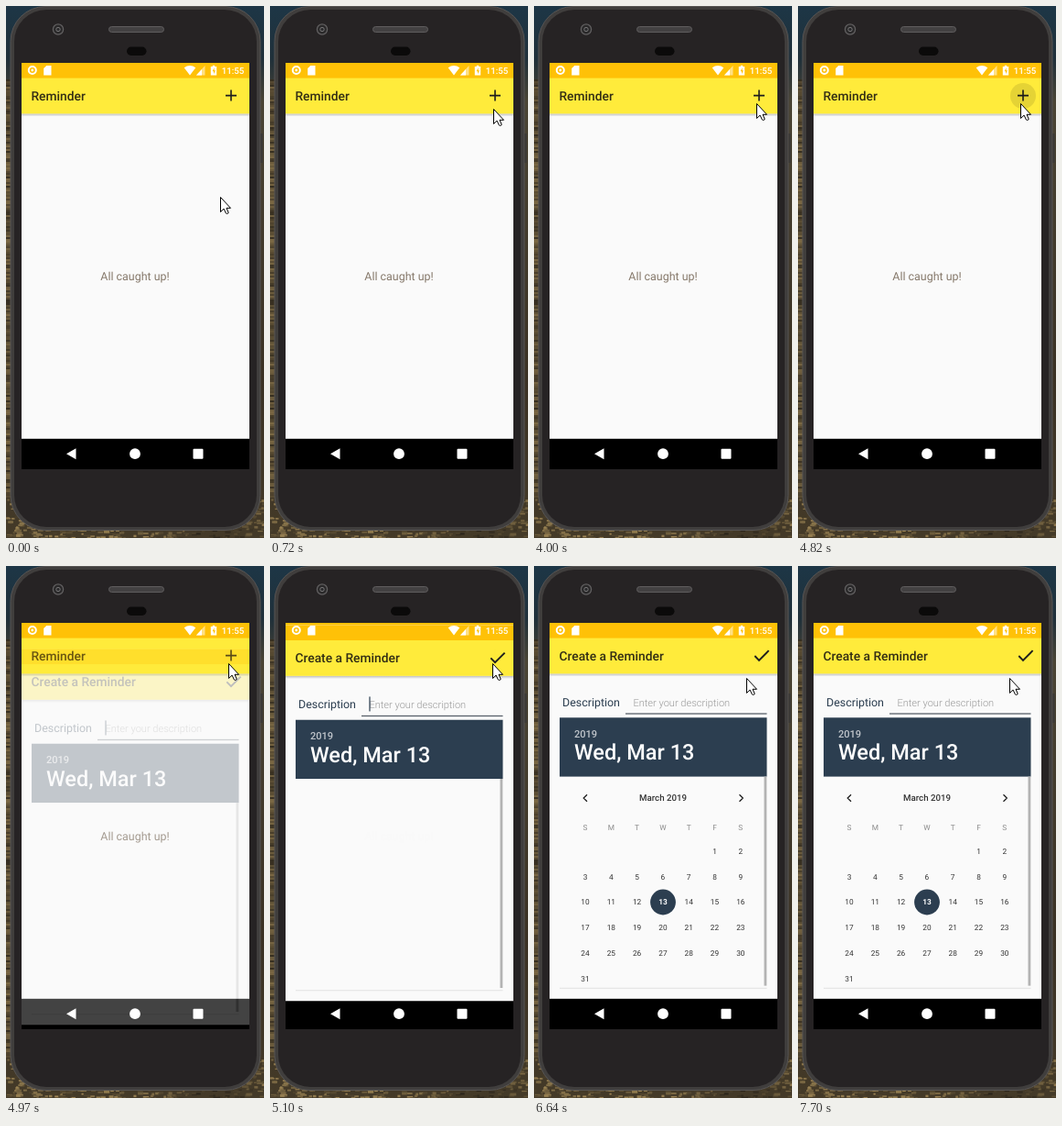
Animation, 282 px wide and 580 px high, one loop 8000 ms. Source, as an HTML page:

```html
<!DOCTYPE html>
<html lang="en">
<head>
<meta charset="utf-8">
<title>Reminder app</title>
<style>
html, body { margin: 0; width: 100%; height: 100%; overflow: hidden; background: #1c1a17; }
svg { display: block; width: 282px; height: 580px; font-family: Roboto, "Noto Sans", sans-serif; text-rendering: geometricPrecision; }
.m { font-weight: 500; }
.mid { text-anchor: middle; }
.title { font-size: 13.8px; font-weight: 500; fill: #332e14; }
.label { font-size: 12.45px; }
.line { fill: none; stroke: #1d1d1d; }
</style>
</head>
<body>
<svg viewBox="0 0 282 580">
  <defs>
    <linearGradient id="sky" x2="0" y2="1">
      <stop offset="0" stop-color="#1d3646"/>
      <stop offset=".1" stop-color="#20303a"/>
      <stop offset=".18" stop-color="#4a4434"/>
      <stop offset=".7" stop-color="#3a3123"/>
      <stop offset="1" stop-color="#443a28"/>
    </linearGradient>
    <linearGradient id="shade" x2="0" y2="1">
      <stop offset="0" stop-opacity=".24"/>
      <stop offset="1" stop-opacity="0"/>
    </linearGradient>
    <clipPath id="screen"><rect x="17" y="62" width="249" height="443"/></clipPath>
    <g id="bars">
      <rect x="17" y="62" width="249" height="443" fill="#fafafa"/>
      <rect x="17" y="117.4" width="249" height="3.2" fill="url(#shade)"/>
      <rect x="17" y="78" width="249" height="39.4" fill="#ffeb3b"/>
      <rect x="17" y="62" width="249" height="16.6" fill="#ffc107"/>
      <rect x="17" y="471.8" width="249" height="33.2"/>
    </g>
  </defs>

  <rect width="282" height="580" fill="url(#sky)"/>
  <g id="wall"></g>

  <!-- phone body -->
  <rect x="5" y=".5" width="273" height="571" rx="38" fill="#403e3d" stroke="#575554"/>
  <rect x="9" y="4" width="265" height="564" rx="35" fill="#262324"/>
  <rect x="278.500" y="139" width="2" height="32" fill="#3a3837"/>
  <circle cx="57" cy="25.500" r="5.600" fill="#2a292a" stroke="#626061" stroke-width="1.300"/>
  <circle cx="57" cy="25.500" r="2.200" fill="#2b2b2d" stroke="#777576"/>
  <rect x="112.500" y="22.500" width="60" height="6" rx="3" fill="#434142" stroke="#5f5d5e"/>
  <rect x="132" y="44.500" width="21.500" height="9.500" rx="4.700" fill="#0b0a0a"/>

  <g clip-path="url(#screen)">
    <use href="#bars"/>
    <text class="title" x="27.500" y="102.600">Reminder</text>
    <path class="line" stroke-width="1.600" d="M240 97.600h12M246 91.600v12"/>
    <circle id="ripple" cx="246" cy="98" fill-opacity=".1"/>
    <text class="label mid" x="141" y="299" fill="#85786a">All caught up!</text>

    <g id="page">
      <use href="#bars"/>
      <text class="title" x="27.500" y="102.600">Create a Reminder</text>
      <path class="line" stroke-width="1.900" d="M241.300 98l4.700 4.800 10.600-10.600"/>
      <text class="label" x="31" y="152.600" fill="#2c3e50">Description</text>
      <text x="108.400" y="152.600" font-size="11.07" font-weight="300" fill="#999">Enter your description</text>
      <rect id="caret" x="108.400" y="140" width="1.200" height="16" fill="#2c3e50"/>
      <rect x="100" y="160.400" width="154.500" height="1.300" fill="#59616a"/>
      <rect x="28" y="165.300" width="226.500" height="64.300" fill="#2c3e50"/>
      <text class="m" x="44" y="187" font-size="11.07" fill="#c0c5cb">2019</text>
      <text class="m" x="44" y="211.300" font-size="23.500" fill="#fff">Wed, Mar 13</text>
      <g id="calendar" class="mid" font-size="8.300" fill="#333">
        <text class="m" x="141" y="256.400" font-size="9.680">March 2019</text>
        <path class="line" stroke-width="1.300" d="M58 249.200l-3.800 3.800 3.800 3.800M224.500 249.200l3.800 3.800-3.800 3.800"/>
        <circle cx="141" cy="366.500" r="13.900" fill="#2c3e50"/>
      </g>
      <rect x="251.500" y="229.600" width="2.800" height="228" fill="#b3b3b3"/>
      <rect x="28" y="459.800" width="226.500" height="1" fill="#e2e2e2"/>
    </g>

    <!-- status bar -->
    <circle cx="28.800" cy="70" r="4" fill="none" stroke="#fff" stroke-width="2"/>
    <circle cx="28.800" cy="70" r="1.400" fill="#fff"/>
    <path fill="#fff" d="M44.300 65h5.200v10.500h-8.300v-7.500zM194.700 67.300q6.300-4.600 12.600 0l-6.300 8.200zM225.800 66v-1.200h2.400v1.200h2v9.500h-6.400v-9.500z"/>
    <path fill="#fff" fill-opacity=".5" d="M217.500 65v10.500h-9.500z"/>
    <path fill="#fff" d="M214 69v6.500h-6z"/>
    <path fill="#ffc107" d="M227.600 67.300l-2 4h1.400v3l2-4h-1.400z"/>
    <text class="m" x="235.800" y="73.600" font-size="9.680" fill="#fff">11:55</text>

    <!-- navigation bar -->
    <path fill="#fff" d="M66 488.200l10.500-6v12z"/>
    <circle cx="141" cy="488.200" r="5.900" fill="#fff"/>
    <rect x="204.500" y="482.700" width="11" height="11" rx="1" fill="#fff"/>
  </g>

  <circle id="click" cx="246" cy="104" r="12" fill="#ff0" fill-opacity=".47"/>
  <path id="cursor" fill="#fff" stroke="#000" d="M.5.5v16l3.600-3.400 2.400 5 1.100.400 1.200-.500.300-1-2.100-4.700h4.500z"/>
</svg>
<script>
const $ = id => document.getElementById(id);
const LOOP = 8000;

function add(parent, tag, attrs, text = "") {
  const el = document.createElementNS("http://www.w3.org/2000/svg", tag);
  for (const k in attrs) el.setAttribute(k, attrs[k]);
  el.textContent = text;
  $(parent).append(el);
}

// Wallpaper: dark and golden streaks beside and below the phone
let seed = 11;
const rnd = () => (seed = seed * 16807 % 2147483647) / 2147483647;
function streak(x, y, w, h, glow) {
  const gold = glow * (.3 + .7 * rnd());
  const c = [25 + 150 * gold, 22 + 126 * gold, 18 + 76 * gold].map(Math.round);
  add("wall", "rect", { x, y, width: w, height: h, fill: `rgb(${c})` });
}
for (let y = 80; y < 535; y += 2) streak(0, y, 5, 2, .65);
for (let i = 0; i < 700; i++) {
  const x = rnd() * 282;
  const glow = .9 - .6 * Math.exp(-(((x - 225) / 40) ** 2));
  streak(x, 535 + rnd() * 45, 2 + rnd() * 5, 1 + rnd() * 2, glow);
}

// Calendar grid; the 1st falls on a Friday
const colX = c => 56 + c * 28.3;
[..."SMTWTFS"].forEach((d, c) => add("calendar", "text", { x: colX(c), y: 287.6, fill: "#8a8a8a" }, d));
for (let d = 1; d <= 31; d++) {
  const cell = d + 4, today = d === 13;
  add("calendar", "text", {
    x: colX(cell % 7), y: 314 + Math.floor(cell / 7) * 27.7,
    fill: today ? "#fff" : "#333", "font-weight": today ? 700 : 400
  }, d);
}

// Pointer: time, x, y, and 1 where it glides on to the next point
const path = [
  [0, 234, 208], [30, 244, 141], [290, 244, 139, 1], [500, 242, 123, 1], [850, 245, 105],
  [1030, 246, 104], [4000, 243, 106], [4050, 242, 111], [4280, 250, 98], [4310, 243, 106],
  [5400, 242, 107, 1], [5430, 239, 111], [5480, 237, 114, 1], [5660, 232, 122], [7700, 231, 122]
];
function pointer(t) {
  const i = path.findLastIndex(p => p[0] <= t);
  const [t0, x, y, glide] = path[i];
  if (!glide) return [x, y];
  const [t1, x1, y1] = path[i + 1], k = (t - t0) / (t1 - t0);
  return [Math.round(x + (x1 - x) * k), Math.round(y + (y1 - y) * k)];
}

const clamp = v => Math.min(1, Math.max(0, v));
const ticks = [4640, 4690, 4740, 4790, 4840, 4920, 4970, 5020, 5070, 5100, 5150, 5200];
const blinks = [5610, 6130, 6640, 7150, 7650];
const show = (id, on) => $(id).setAttribute("visibility", on ? "inherit" : "hidden");

function draw(t) {
  $("cursor").setAttribute("transform", `translate(${pointer(t)})`);
  show("click", t >= 1460 && t < 1490);

  const s = ticks.findLast(v => v <= t) || 0;
  $("ripple").setAttribute("r", s < 4640 ? 0 : 5 + 9 * clamp((s - 4640) / 150));
  $("ripple").setAttribute("opacity", 1 - clamp((s - 4790) / 170));

  // The new page fades in while it rises by 8% of the screen
  const age = s - 4955;
  const rise = 35.4 * (1 - clamp(age / 350)) ** 5;
  show("page", age > 0);
  $("page").setAttribute("opacity", 1 - (1 - clamp(age / 200)) ** 4);
  $("page").setAttribute("transform", `translate(0 ${s < 5200 ? rise : 0})`);

  show("calendar", age > 0 && t >= 5400);
  show("caret", age > 0 && blinks.filter(b => b <= t).length % 2 === 0);
}

const start = performance.now();
function frame() {
  draw((performance.now() - start) % LOOP);
  requestAnimationFrame(frame);
}
frame();
</script>
</body>
</html>
```
